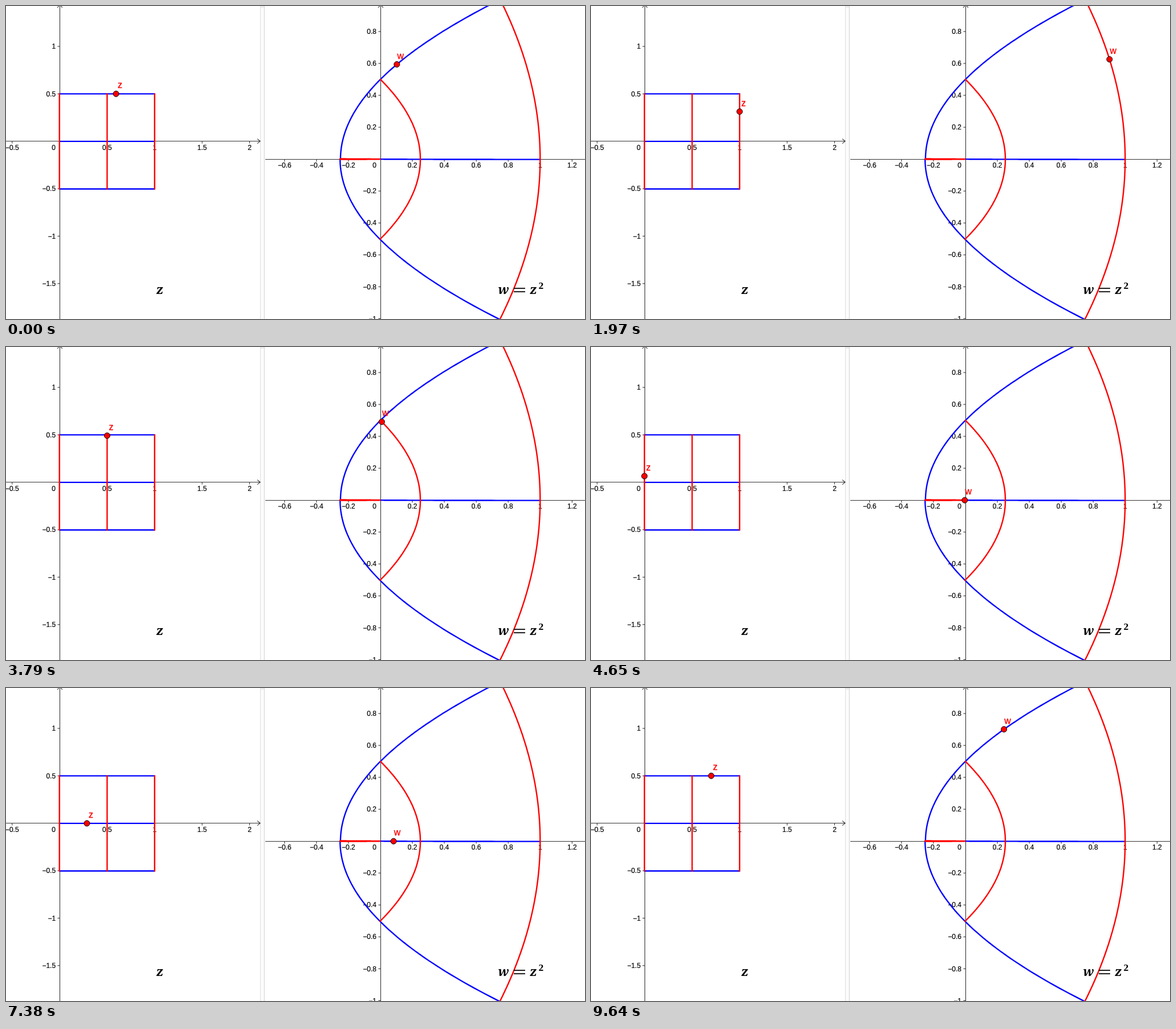
An HTML page that plays this animation: 1016 by 550 pixels, repeating every 9.74 s.

```html
<!DOCTYPE html>
<html lang="en">
<head>
<meta charset="utf-8">
<title>Complex square map</title>
<style>
  html, body { margin: 0; width: 100%; height: 100%; overflow: hidden; background: #fff; }
  svg { display: block; width: 1016px; height: 550px; }
  .axis { stroke: #333; stroke-width: 1.1; fill: none; }
  .line { stroke-width: 2.4; fill: none; stroke-linecap: round; }
  .tick { font: 12px "Liberation Sans", Arial, sans-serif; stroke: #000; stroke-width: .2; }
  .name { font: 16px "Liberation Sans", Arial, sans-serif; fill: #f00; stroke: #f00; stroke-width: .3; text-anchor: middle; }
  .math { font: italic bold 22px "Noto Serif", serif; text-anchor: middle; }
  .sup { font: bold 17.5px "Liberation Serif", serif; text-anchor: middle; }
  .dot { fill: #f00; stroke: #000; stroke-width: 1; }
</style>
</head>
<body>
<svg id="stage" viewBox="0 0 1016 550"></svg>
<script>
const stage = document.getElementById('stage');
const RED = '#f00', BLUE = '#00f';

function add(tag, attrs, text) {
  const el = document.createElementNS('http://www.w3.org/2000/svg', tag);
  for (const k in attrs) el.setAttribute(k, attrs[k]);
  if (text) el.textContent = text;
  stage.appendChild(el);
  return el;
}

const plane = (ox, oy, unit) => ([re, im]) => [ox + unit * re, oy - unit * im];
const zPlane = plane(94.1, 237.7, 166.7);
const wPlane = plane(657, 269.1, 280.3);
const square = ([x, y]) => [x * x - y * y, 2 * x * y];
const mix = (a, b, f) => a + (b - a) * f;

const axis = d => add('path', { class: 'axis', d });
const label = (x, y, value, anchor) =>
  add('text', { class: 'tick', x, y, 'text-anchor': anchor }, String(value).replace('-', '\u2212'));

// Ticks at every multiple of step between the two indices, zero excepted.
function ticks(from, to, step, draw) {
  for (let i = from; i <= to; i++) if (i) draw(+(i * step).toFixed(1));
}

function drawAxes(map, left, right, step, [x0, x1], [y0, y1]) {
  const [ox, oy] = map([0, 0]);
  const ax = Math.floor(ox) + 0.5, ay = Math.floor(oy) + 0.5;
  axis(`M${left} ${ay}H${right}M${ax} 550V-1M${ax - 4.4} 3L${ax} -2L${ax + 4.4} 3`);
  label(ox - 10.5, oy + 15, 0, 'middle');
  ticks(x0, x1, step, v => {
    const x = map([v, 0])[0];
    axis(`M${x} ${ay}v4`);
    label(x, oy + 15, v, 'middle');
  });
  ticks(y0, y1, step, v => {
    const y = map([0, v])[1];
    axis(`M${ax} ${y}h-4`);
    label(ox - 7, y + 4.2, v, 'end');
  });
}

// The six grid lines in the order the point runs along them.
// They sit a hair off the exact grid, which slightly opens the folded image of the left side.
const TOP = 0.5, BOTTOM = -0.5025;
const across = im => ({ color: BLUE, at: f => [f, im] });
const upward = re => ({ color: RED, at: f => [re, mix(BOTTOM, TOP, f)] });
const route = [across(TOP), upward(1), upward(0.5), upward(-0.002), across(BOTTOM), across(-0.001)];

function trace(color, at) {
  const pts = Array.from({ length: 61 }, (_, i) => at(i / 60).map(v => v.toFixed(2)).join(' '));
  add('path', { class: 'line', stroke: color, d: 'M' + pts.join('L') });
}

// Divider between the two views
add('rect', { x: 446, y: 0, width: 8, height: 550, fill: '#fcfcfc' });
add('rect', { x: 447, y: 0, width: 6, height: 3, fill: '#ededed' });
add('path', { d: 'M446.5 0V550', stroke: '#dedede' });
add('path', { d: 'M453.3 0V550', stroke: '#d0d0d0' });

drawAxes(zPlane, 0, 446, 0.5, [-1, 4], [-3, 2]);
axis('M441 233.3L446 237.5L441 241.7');
drawAxes(wPlane, 455, 1016, 0.2, [-3, 6], [-5, 4]);

for (const ink of [BLUE, RED]) {
  for (const { color, at } of route) {
    if (color !== ink) continue;
    trace(color, f => zPlane(at(f)));
    trace(color, f => wPlane(square(at(f))));
  }
}

add('text', { class: 'math', x: 270, y: 506 }, 'z');
add('text', { class: 'math', x: 873, y: 506 }, 'w');
add('path', { d: 'M891 496.2H911M891 502.2H911', stroke: '#000', 'stroke-width': 1.8 });
add('text', { class: 'math', x: 925.5, y: 506 }, 'z');
add('text', { class: 'sup', x: 938.8, y: 496.5 }, '2');

function marker(name, dx) {
  const dot = add('circle', { class: 'dot', r: 5 });
  const text = add('text', { class: 'name' }, name);
  return ([x, y]) => {
    dot.setAttribute('cx', x);
    dot.setAttribute('cy', y);
    text.setAttribute('x', x + dx);
    text.setAttribute('y', y - 10);
  };
}
const moveZ = marker('z', 7);
const moveW = marker('w', 6.4);

// Time in ms and distance along the route, one unit per grid line
const keys = [
  [0, 0.594], [1080, 1.285], [2930, 2.455], [4650, 3.566],
  [6080, 4.475], [7380, 5.287], [9640, 6.701]
];
const LOOP = 9740, STEP = 59;

// Near-steady speed, advancing in short even steps
function distance(t) {
  const next = keys.findIndex(([time]) => time > t);
  if (next < 0) return keys[keys.length - 1][1];
  const [t0, u0] = keys[next - 1], [t1, u1] = keys[next];
  const steps = Math.round((t1 - t0) / STEP);
  return mix(u0, u1, Math.floor((t - t0) / (t1 - t0) * steps + 1e-6) / steps);
}

function render(t) {
  const u = distance(t), leg = Math.floor(u);
  const z = route[leg % route.length].at(u - leg);
  moveZ(zPlane(z));
  moveW(wPlane(square(z)));
}

const start = performance.now();
function tick() {
  render((performance.now() - start) % LOOP);
  requestAnimationFrame(tick);
}
tick();
</script>
</body>
</html>
```
